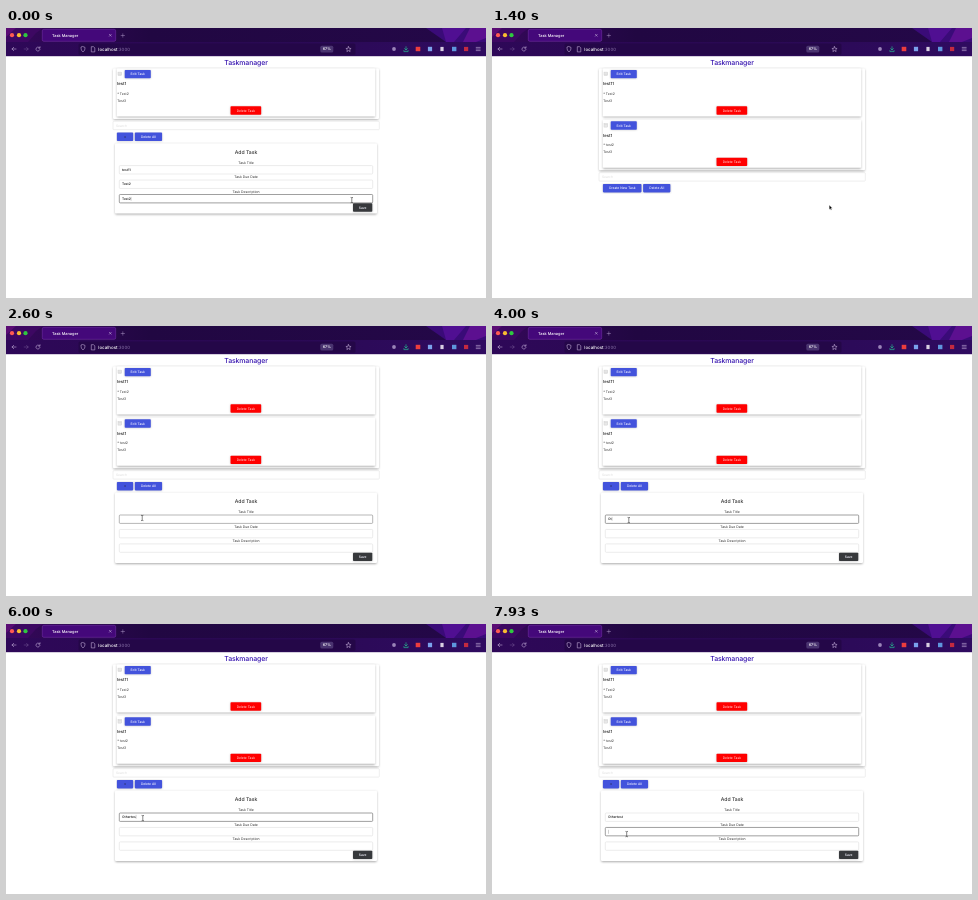
Animation of 480 by 270 pixels, one loop 8 s. Source, as an HTML page:

```html
<!DOCTYPE html>
<html lang="en">
<head>
<meta charset="utf-8">
<title>Taskmanager</title>
<style>
html, body { margin: 0; width: 100%; height: 100%; overflow: hidden; background: #fff }
svg { display: block; width: 100%; height: 100% }
text { font-family: Inter, Roboto, sans-serif; text-rendering: geometricPrecision; white-space: pre }
.line { fill: none; stroke: #bfa9d6; stroke-width: .6; stroke-linecap: round; stroke-linejoin: round }
</style>
</head>
<body>
<svg viewBox="0 0 480 270">
  <defs>
    <linearGradient id="bar"><stop stop-color="#2e0858"/><stop offset=".5" stop-color="#290952"/><stop offset="1" stop-color="#2f0b60"/></linearGradient>
    <linearGradient id="strip"><stop stop-color="#35085a"/><stop offset=".3" stop-color="#210742"/><stop offset="1" stop-color="#240848"/></linearGradient>
    <filter id="soft" x="-5%" y="-10%" width="110%" height="125%"><feGaussianBlur stdDeviation=".8"/></filter>
  </defs>
  <g id="chrome"></g>
  <g id="page"></g>
</svg>
<script>
const LOOP = 8000, BLINK = 530;
const INK = '#333', BLUE = '#4353dc', BLUE_HOVER = '#6c7aec', TEAL = '#5f9da6';
const ROW = 51.4;                        // height of one task
const MEDIUM = 'font-weight="500"';

const rect = (x, y, w, h, fill, extra = '') =>
  `<rect x="${x}" y="${y}" width="${w}" height="${h}" fill="${fill}" ${extra}/>`;
const dot = (x, y, r, fill) => `<circle cx="${x}" cy="${y}" r="${r}" fill="${fill}"/>`;
const line = (d, extra = '') => `<path class="line" d="${d}" ${extra}/>`;
const shape = (d, fill) => `<path d="${d}" fill="${fill}"/>`;
// text placed by its vertical middle
const text = (s, x, y, size, fill = INK, extra = '') =>
  `<text x="${x}" y="${y + size * .36}" font-size="${size}" fill="${fill}" ${extra}>${s}</text>`;
const mid = (s, x, y, size, fill, extra = '') => text(s, x, y, size, fill, 'text-anchor="middle" ' + extra);
const button = (s, x, y, w, fill, ink = '#f4f4ff') =>
  rect(x, y + .3, w, 8.4, '#0003', 'rx=".8" filter="url(#soft)"') +
  rect(x, y, w, 8.4, fill, 'rx=".8"') + mid(s, x + w / 2, y + 4.2, 3.3, ink, MEDIUM);
const paper = (x, y, w, h) =>
  rect(x + .3, y + .9, w - .6, h, '#0005', 'rx="1" filter="url(#soft)"') + rect(x, y, w, h, '#fff', 'rx="1"');

function chrome() {
  return rect(0, 0, 480, 14, 'url(#strip)') +
    shape('M0 0H37L30 5 22 14H0Z', '#3d0862') + shape('M0 0H10L0 9Z', '#5a0c74') +
    shape('M420 0H480V14H440Z', '#3a0b78') + shape('M436 0H460L448 14H440Z', '#500f92') +
    shape('M464 0H480V10L470 14H457Z', '#5c1090') +
    rect(0, 14, 480, 14.2, 'url(#bar)') +
    rect(36.3, 1.3, 73.4, 12, '#44087a', 'rx="1.5" stroke="#7a35ae" stroke-width=".5"') +
    dot(6, 7.2, 2.1, '#ff5a52') + dot(13, 7.2, 2.1, '#f8bd30') + dot(19.5, 7.2, 2.1, '#2fc840') +
    text('Task Manager', 46, 7.5, 3.9, '#fff', MEDIUM) +
    line('M103.4 6.4l1.8 1.8m0-1.8l-1.8 1.8') + line('M116.8 5.8v3.4m-1.7-1.7h3.4', 'opacity=".7"') +
    line('M10 21H6m1.7-1.7l-1.7 1.7 1.7 1.7') + line('M18.2 21h4m-1.7-1.7l1.7 1.7-1.7 1.7', 'opacity=".4"') +
    line('M33.6 19.8a2 2 0 1 0 .4 1.5M34 18.7v1.4h-1.4') +
    rect(72.5, 15.5, 277, 11.3, '#240748', 'rx="1.6"') +
    line('M77 18.6l2 .8c0 2.4-.6 3.6-2 4.5-1.4-.9-2-2.1-2-4.5Z') +
    line('M85.7 18.7h1.9l1.2 1.2v4h-3.1Z') +
    text(`<tspan ${MEDIUM}>localhost</tspan><tspan fill="#8d77ab">:3000</tspan>`, 92.3, 21.2, 4.45, '#fff') +
    rect(314.3, 17.8, 13, 6.6, '#4a3470', 'rx="1.5"') + mid('67%', 320.8, 21.1, 3.6, '#fff', 'font-weight="600"') +
    line('M342.5 18.6l.8 1.7 1.8.2-1.4 1.2.4 1.9-1.6-1-1.6 1 .4-1.9-1.4-1.2 1.8-.2Z') +
    dot(388, 21, 1.9, '#9a84b8') +
    line('M400 18.7v3.3m-1.4-1.4l1.4 1.4 1.4-1.4M397.9 22.5v1.1h4.2v-1.1', 'style="stroke:#25cf98"') +
    rect(409.7, 18.8, 4.6, 4.4, '#ed3d3d') + rect(421.9, 18.8, 4.2, 4.4, '#7ba2ec') +
    rect(434.4, 18.9, 3.2, 4.2, '#d8d0e2') + rect(446, 18.8, 4.4, 4.4, '#5e96dc') +
    rect(458, 18.9, 4.2, 4.2, '#c42a40') +
    line('M470.2 19.4h4M470.2 21h4M470.2 22.6h4');
}

// [time, x, y] of the pointer
const PATH = [[0, 345.8, 172], [380, 345.8, 172], [530, 357.6, 178.6], [1300, 357.6, 178.6],
  [1850, 127.6, 160], [2330, 127.6, 160], [2650, 136.8, 194], [6250, 136.8, 194],
  [6480, 136.8, 216.3], [7250, 136.8, 216.3], [7420, 134.7, 210], [LOOP, 134.7, 210]];
const ADDED = 1230, OPENED = 2150, TITLE_FOCUS = 2740, DATE_FOCUS = 7450;
const KEYS = [3870, 3950, 4070, 4130, 4330, 5270, 5670, 5930, 6130];

function pointer(t) {
  const i = PATH.findIndex(p => p[0] > t), [t0, x0, y0] = PATH[i - 1], [t1, x1, y1] = PATH[i];
  const u = (t - t0) / (t1 - t0), e = u * u * (3 - 2 * u);
  return [x0 + (x1 - x0) * e, y0 + (y1 - y0) * e];
}

function drawPointer(kind, x, y) {
  const [d, fill] = {
    text: ['M-1.2-2.6Q0-2.6 0-1.9 0-2.6 1.2-2.6M0-1.9V2.1M-1.2 2.8Q0 2.8 0 2.1 0 2.8 1.2 2.8', 'none'],
    arrow: ['M0 0V4.6L1.1 3.7 1.8 5.3 2.6 4.9 1.9 3.4H3.3Z', '#000'],
    hand: ['M0 0Q.8-.5 1 .3V1.7L2.9 2.1Q3.6 2.4 3.3 3.4L2.8 4.9H.5L-1.2 2.9Q-1 2.2 0 2.8Z', '#fff']
  }[kind];
  const stroke = kind == 'arrow' ? '#fff' : '#222';
  return `<path transform="translate(${x} ${y})" d="${d}" fill="${fill}" stroke="${stroke}" stroke-width="${kind == 'text' ? .55 : .4}"/>`;
}

function task(y, [title, date, note]) {
  return paper(110.7, y, 258.6, 48.2) +
    rect(112, y + 3.9, 3.6, 3.6, '#f4f4f4', 'stroke="#c4c4c4" stroke-width=".4"') +
    line(`M112.6 ${y + 5}h2.4m-2.4 1.4h2.4`, 'style="stroke:#bbb;stroke-width:.4"') +
    button('Edit Task', 118.7, y + 1.7, 26.1, BLUE) +
    text(title, 110.9, y + 15.4, 4.2, '#222', MEDIUM) +
    text('* ' + date, 111.2, y + 25.1, 3.4) + text(note, 111.2, y + 32.6, 3.4) +
    button('Delete Task', 224.5, y + 38.1, 30.7, '#f00', '#ffc4c4');
}

const inside = ([px, py], x, y, w, h) => px >= x && px <= x + w && py >= y && py <= y + h;

function draw(t) {
  const p = pointer(t), old = ['test1', t < ADDED ? 'Test2' : 'test2', 'Test3'];
  const tasks = t < ADDED ? [old] : [['test11', 'Test2', 'Test3'], old];
  const open = t < ADDED || t >= OPENED, down = (tasks.length - 1) * ROW;
  let kind = 'arrow';
  let s = mid('Taskmanager', 240, 34.2, 6.9, '#3310ae', MEDIUM + ' letter-spacing="-.1"') + paper(107, 40.3, 266, 50.6 + down);
  tasks.forEach((item, i) => s += task(40.2 + i * ROW, item));
  s += rect(107, 93.3 + down, 266.3, 8.4, '#fff', 'rx=".8" stroke="#ddd" stroke-width=".5"') +
    text('Search', 110, 97.5 + down, 3.3, '#ddd');

  const y = 104.6 + down, wide = open ? 16.3 : 38.6;
  const over = inside(p, 110.9, y, wide, 8.4);
  s += button(open ? '×' : 'Create New Task', 110.9, y, wide, over ? BLUE_HOVER : BLUE, open ? '#223' : undefined) +
    button('Delete All', 112.5 + wide, y, 27.3, BLUE);
  if (over) kind = 'hand';

  if (open) {
    const typed = KEYS.filter(k => k <= t);
    const values = t < ADDED
      ? ['test11', 'Test2', 'Test' + (t < 130 ? '2' : t < 270 ? '' : '3')]
      : ['Othertest'.slice(0, typed.length), '', ''];
    const focus = t < ADDED ? 2 : t < TITLE_FOCUS ? -1 : t < DATE_FOCUS ? 0 : 1;
    const since = t - (t < ADDED ? 270 : t < DATE_FOCUS ? typed.at(-1) || TITLE_FOCUS : DATE_FOCUS);
    const caret = since < 0 || since / BLINK % 2 < 1;
    s += paper(109, 115.2 + down, 262, 70.4) + mid('Add Task', 240, 123.7 + down, 5.1, INK, MEDIUM);
    ['Task Title', 'Task Due Date', 'Task Description'].forEach((label, i) => {
      const top = 137.6 + down + i * 14.45, hover = inside(p, 113.3, top - 2.2, 253.4, 10.6);
      if (inside(p, 113.3, top, 253.4, 8.4)) kind = 'text';
      const edge = hover ? '#6c6c6c' : i == focus ? TEAL : '#d8d8d8';
      s += mid(label, 240, top - 3.1, 3.45) +
        rect(113.3, top, 253.4, 8.4, '#fff', `rx=".9" stroke="${edge}" stroke-width="${i == focus ? .65 : .5}"`) +
        text(values[i] + (i == focus && caret ? '<tspan fill="#000" dx="-.2" font-weight="300">|</tspan>' : ''),
          116, top + 4.2, 3.3, '#111', MEDIUM);
    });
    const save = inside(p, 347, 175.3 + down, 19.3, 8.4);
    if (save) kind = 'hand';
    s += button('Save', 347, 175.3 + down, 19.3, save ? '#5b5d61' : '#37393c');
  }
  page.innerHTML = s + drawPointer(kind, ...p);
}

const page = document.getElementById('page');
document.getElementById('chrome').innerHTML = chrome();
function tick() {
  draw(performance.now() % LOOP);
  requestAnimationFrame(tick);
}
tick();
</script>
</body>
</html>
```
